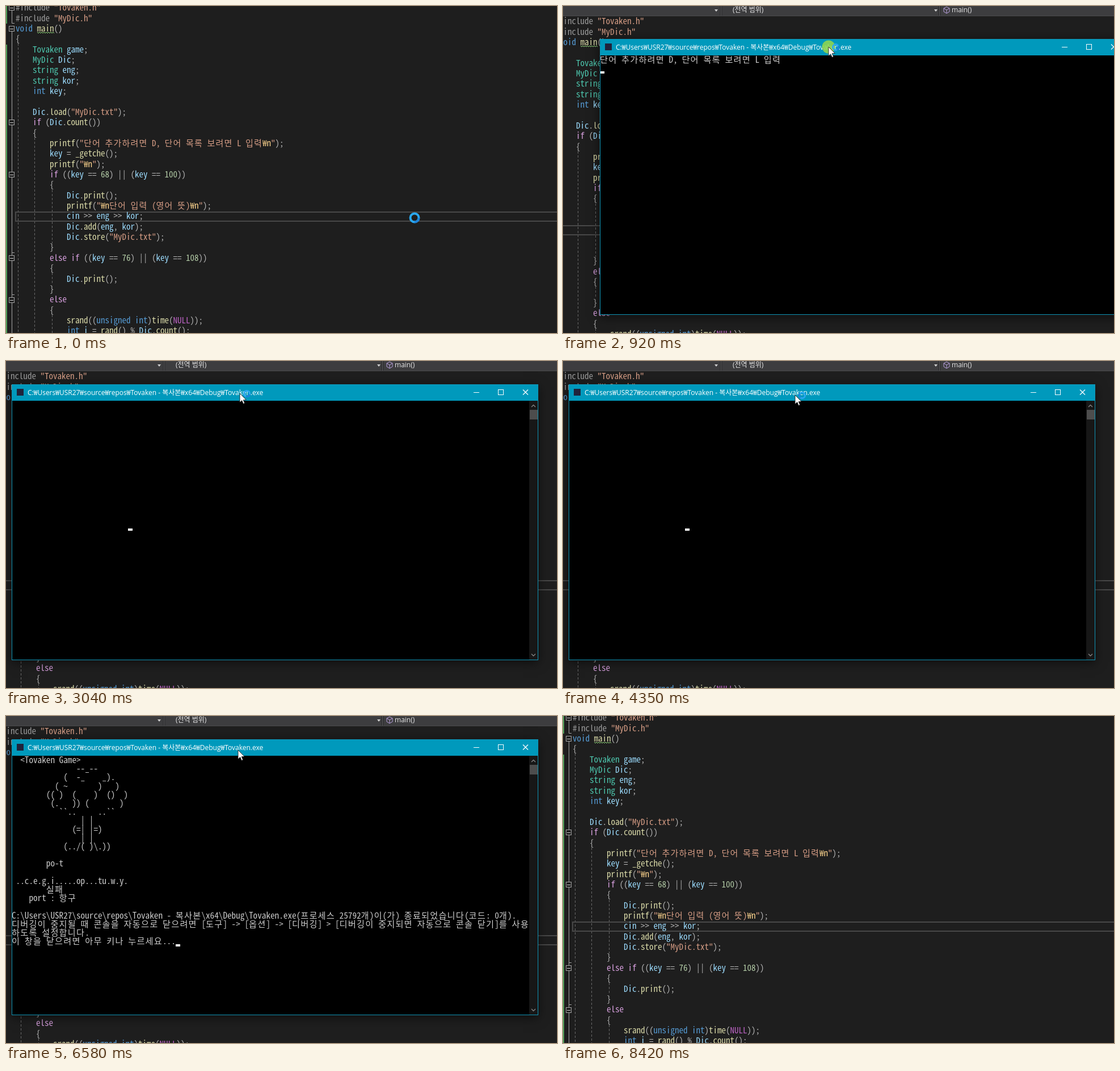
Animation, 971 px wide and 576 px high, one loop 8490 ms. Source, as an HTML page with a canvas:

```html
<!DOCTYPE html>
<html lang="ko">
<head>
<meta charset="utf-8">
<title>Console game</title>
<style>
html, body { margin: 0; width: 100%; height: 100%; overflow: hidden; background: #1e1e1e; }
canvas { display: block; }
</style>
</head>
<body>
<canvas id="stage" width="971" height="576"></canvas>
<script>
const ctx = document.getElementById('stage').getContext('2d');
const LOOP = 8490;
const MONO = '"Noto Sans Mono CJK KR", "Liberation Mono", "Noto Sans CJK KR", monospace';
const UI = '"Open Sans", "Noto Sans CJK KR", sans-serif';
const PATH = 'C:\\Users\\USR27\\source\\repos\\Tovaken - 복사본\\x64\\Debug\\Tovaken.exe';

const CODE = `#include "Tovaken.h"
#include "MyDic.h"
void main()
{
    Tovaken game;
    MyDic Dic;
    string eng;
    string kor;
    int key;

    Dic.load("MyDic.txt");
    if (Dic.count())
    {
        printf("단어 추가하려면 D, 단어 목록 보려면 L 입력₩n");
        key = _getche();
        printf("₩n");
        if ((key == 68) || (key == 100))
        {
            Dic.print();
            printf("₩n단어 입력 (영어 뜻)₩n");
            cin >> eng >> kor;
            Dic.add(eng, kor);
            Dic.store("MyDic.txt");
        }
        else if ((key == 76) || (key == 108))
        {
            Dic.print();
        }
        else
        {
            srand((unsigned int)time(NULL));
            int i = rand() % Dic.count();`.split('\n');

const PROMPT = ['단어 추가하려면 D, 단어 목록 보려면 L 입력'];
const TREE = [
  '  <Tovaken Game>',
  '               --_--',
  '            (  -_    _).',
  '          ( ~       )   )',
  '        (( )  (    )  ()  )',
  '         (.   )) (       )',
  '           ``..     ..``',
  '                | |',
  '              (=| |=)',
  '                | |',
  '            (../( )\\.))',
  ''
];
const RESULT = [
  '        실패',
  '    port : 항구',
  '',
  PATH + '(프로세스 25792개)이(가) 종료되었습니다(코드: 0개).',
  '디버깅이 중지될 때 콘솔을 자동으로 닫으려면 [도구] -> [옵션] -> [디버깅] > [디버깅이 중지되면 자동으로 콘솔 닫기]를 사용',
  '하도록 설정합니다.',
  '이 창을 닫으려면 아무 키나 누르세요...'
];

// [time, letter]
const GUESSES = [[2700, 'o'], [3100, 't'], [3700, 'i'], [3980, 'u'], [4410, 'c'],
  [4700, 'y'], [5000, 'w'], [5350, 'e'], [5800, 'p'], [6130, 'g']];

// [time, x, y]
const MOUSE = [[0, 720, 373], [200, 720, 373], [800, 468, 74], [920, 468, 72], [1310, 414, 55],
  [1480, 412, 55], [3040, 412, 57], [4350, 409, 60], [7110, 409, 60], [7760, 898, 548]];
const WINDOW = [[920, 65, 58], [1310, 12, 41], [1480, 10, 41]];

const TOKENS = [
  [/^"[^"]*"/, '#d69d85'],
  [/^#\w+/, '#9b9b9b'],
  [/^(void|int|unsigned)\b/, '#569cd6'],
  [/^(if|else)\b/, '#d8a0df'],
  [/^(Tovaken|MyDic|string)\b/, '#4ec9b0'],
  [/^NULL\b/, '#bd63c5'],
  [/^\w+(?=\()/, '#dcdcaa'],
  [/^\d+/, '#b5cea8'],
  [/^[A-Za-z]\w*/, '#9cdcfe'],
  [/^\s+/, '#fff'],
  [/^./, '#b4b4b4']
];

ctx.font = `100px ${MONO}`;
const advance = ctx.measureText('0').width / 100;

function rect(x, y, w, h, color) {
  ctx.fillStyle = color;
  ctx.fillRect(x, y, w, h);
}

function line(points, color, width = 1) {
  ctx.beginPath();
  points.forEach(([x, y]) => ctx.lineTo(x, y));
  ctx.strokeStyle = color;
  ctx.lineWidth = width;
  ctx.stroke();
}

function label(s, x, y, color, size = 12) {
  ctx.font = `${size}px ${UI}`;
  ctx.fillStyle = color;
  ctx.fillText(s, x, y);
}

// Terminal-style text: wide characters take two columns. Returns the next x.
function cells(s, x, y, pitch, color) {
  ctx.fillStyle = color;
  for (const c of s) {
    const wide = c >= '\u2e80';
    if (c !== ' ') {
      ctx.font = `${wide ? pitch * 2 : pitch / advance}px ${MONO}`;
      ctx.fillText(c, x, y);
    }
    x += wide ? pitch * 2 : pitch;
  }
  return x;
}

function along(keys, t) {
  if (t <= keys[0][0]) return keys[0].slice(1);
  for (let i = 1; i < keys.length; i++) {
    const [t0, x0, y0] = keys[i - 1], [t1, x1, y1] = keys[i];
    if (t < t1) {
      const u = (t - t0) / (t1 - t0), e = u * u * (3 - 2 * u);
      return [x0 + (x1 - x0) * e, y0 + (y1 - y0) * e];
    }
  }
  return keys[keys.length - 1].slice(1);
}

function codeLine(s, x, y) {
  while (s) {
    const [re, color] = TOKENS.find(([r]) => r.test(s));
    const word = s.match(re)[0];
    if (word[0] === '"') {
      for (const part of word.split(/(₩n)/)) {
        x = cells(part, x, y, 7.5, part === '₩n' ? '#ffd68f' : color);
      }
    } else {
      x = cells(word, x, y, 7.5, color);
    }
    s = s.slice(word.length);
  }
}

function foldMarks() {
  rect(0, 0, 2, 31, '#4f9e58');
  rect(0, 68, 2, 508, '#4f9e58');
  line([[10.5, 0], [10.5, 30.5], [15, 30.5]], '#a5a5a5');
  line([[10.5, 45], [10.5, 580]], '#a5a5a5');
  for (const y of [434.5, 508.5]) line([[10, y], [15, y]], '#a5a5a5');
  for (const y of [3, 40, 205, 297, 444, 518]) {
    rect(5, y - 5, 10, 10, '#1e1e1e');
    ctx.strokeStyle = '#a5a5a5';
    ctx.lineWidth = 1;
    ctx.strokeRect(5.5, y - 4.5, 9, 9);
    line([[7, y + .5], [13, y + .5]], '#d0d0d0');
  }
}

function guides() {
  ctx.setLineDash([4, 3]);
  const spans = [[21, 66, 580], [50, 232, 580], [81, 324, 418], [81, 470, 491], [81, 544, 580]];
  for (const [x, top, bottom] of spans) line([[x + .5, top], [x + .5, bottom]], '#686868');
  ctx.setLineDash([]);
}

function toolbar() {
  rect(0, 0, 971, 18, '#3d3d3f');
  rect(0, 17, 971, 1, '#4a4a4c');
  for (const x of [277, 662]) {
    rect(x, 0, 3, 17, '#222224');
    rect(x + 1, 0, 1, 17, '#68686a');
  }
  for (const x of [270, 657]) {
    ctx.beginPath();
    ctx.moveTo(x - 3, 6);
    ctx.lineTo(x + 3, 6);
    ctx.lineTo(x, 10);
    ctx.fillStyle = '#d0d0d0';
    ctx.fill();
  }
  label('(전역 범위)', 299, 11, '#e6e6e6');
  line([[676, 1.5], [681, 4], [681, 10], [676, 13], [671, 10], [671, 4], [676, 1.5]], '#b8a0dc');
  line([[671, 4], [676, 7], [681, 4]], '#b8a0dc');
  line([[676, 7], [676, 13]], '#b8a0dc');
  label('main()', 685, 11, '#e6e6e6');
}

function editor(debugging) {
  rect(0, 0, 971, 576, '#1e1e1e');
  ctx.save();
  if (debugging) ctx.translate(-24, 24);
  else foldMarks();
  guides();
  ctx.strokeStyle = '#484848';
  ctx.lineWidth = 2;
  ctx.strokeRect(17, 363, 1000, 16);
  CODE.forEach((s, i) => codeLine(s, 17, 8.3 + i * 18.355));
  const wave = [];
  for (let x = 55; x <= 85; x += 2) wave.push([x, 46 + (x - 55) / 2 % 2 * 2]);
  line(wave, '#95db7d');
  ctx.restore();
  if (debugging) toolbar();
}

function consoleRows(t) {
  if (t < 650) return [];
  if (t < 1650) return PROMPT;
  if (t >= 3040 && t < 3100 || t >= 4350 && t < 4410) return [];
  const seen = GUESSES.filter(g => t >= g[0]).map(g => g[1]);
  const show = (s, blank) => [...s].map(c => seen.includes(c) ? c : blank).join('');
  const rows = [...TREE, '        ' + show('port', '-'), '',
    ' ' + show('abcdefghijklmnopqrstuvwxyz', '.')];
  return t < 6580 ? rows : rows.concat(RESULT);
}

function caret(t) {
  if (t >= 6580) {
    return (t < 7110 || t >= 7560 && t < 8020) && [38, 21];
  }
  const on = (t - 650) % 1060 < 530 || t >= 5260;
  const spot = t < 650 ? [0, 0] : t < 1650 ? [0, 1] : [27, 14];
  return on && spot;
}

function consoleWindow(t) {
  ctx.save();
  ctx.translate(...along(WINDOW, t).map(Math.round));

  ctx.shadowColor = 'rgba(0,0,0,.55)';
  ctx.shadowBlur = 18;
  ctx.shadowOffsetY = 4;
  rect(0, 0, 928, 486, '#000');
  ctx.shadowColor = 'transparent';

  rect(0, 0, 928, 29, '#0099bc');
  rect(9, 8, 12, 12, '#20243c');
  label(PATH.replaceAll('\\', '₩'), 28, 18.5, '#fff');
  line([[814, 14.5], [824, 14.5]], '#fff');
  ctx.strokeRect(857.5, 9.5, 9, 9);
  line([[901, 9.5], [910, 18.5]], '#fff', 1.2);
  line([[910, 9.5], [901, 18.5]], '#fff', 1.2);

  rect(912, 29, 15, 456, '#171717');
  rect(913, 45, 14, 17, '#4d4d4d');
  line([[916, 40], [919.5, 36.5], [923, 40]], '#858585', 1.3);
  line([[916, 475], [919.5, 478.5], [923, 475]], '#858585', 1.3);

  consoleRows(t).forEach((s, i) => cells(s, 0, 42 + i * 15.2, 7.6, '#ccc'));
  const spot = caret(t);
  if (spot) rect(Math.round(spot[0] * 7.6), Math.round(41.5 + spot[1] * 15.2), 8, 4, '#fff');

  ctx.strokeStyle = '#1094b5';
  ctx.lineWidth = 1;
  ctx.strokeRect(.5, .5, 927, 485);
  ctx.restore();
}

function busyRing(x, y, r, width, t) {
  const turn = t / 1000 * Math.PI * 2;
  ctx.lineWidth = width;
  [['#2aa8f0', 0, 7], ['#1c82d8', turn, turn + 1.6]].forEach(([color, from, to]) => {
    ctx.beginPath();
    ctx.arc(x, y, r, from, to);
    ctx.strokeStyle = color;
    ctx.stroke();
  });
}

function pointer(t) {
  if (t > 7780) return;
  const [x, y] = along(MOUSE, t);
  if (t < 520) {
    busyRing(x, y, 7.5, 4, t);
    return;
  }
  if (t > 860 && t < 1560) {
    ctx.beginPath();
    ctx.arc(x, y, 11.5, 0, 7);
    ctx.fillStyle = 'rgba(150,215,75,.85)';
    ctx.fill();
  }
  if (t < 6320) busyRing(x + 12.5, y + .5, 5, 3, t);
  ctx.save();
  ctx.translate(x, y);
  ctx.beginPath();
  [[0, 0], [0, 16], [3.7, 12.6], [6.2, 18.4], [8.6, 17.3], [6.2, 11.7], [11.2, 11.4]]
    .forEach(p => ctx.lineTo(...p));
  ctx.closePath();
  ctx.fillStyle = '#fff';
  ctx.fill();
  ctx.strokeStyle = '#111';
  ctx.lineWidth = .8;
  ctx.stroke();
  ctx.restore();
}

function frame(now) {
  const t = now % LOOP;
  editor(t >= 330 && t < 6710);
  if (t >= 520 && t < 8420) consoleWindow(t);
  pointer(t);
  requestAnimationFrame(frame);
}

const start = performance.now();
frame(0);
function tick() {
  return Math.max(0, performance.now() - start);
}
</script>
</body>
</html>
```
